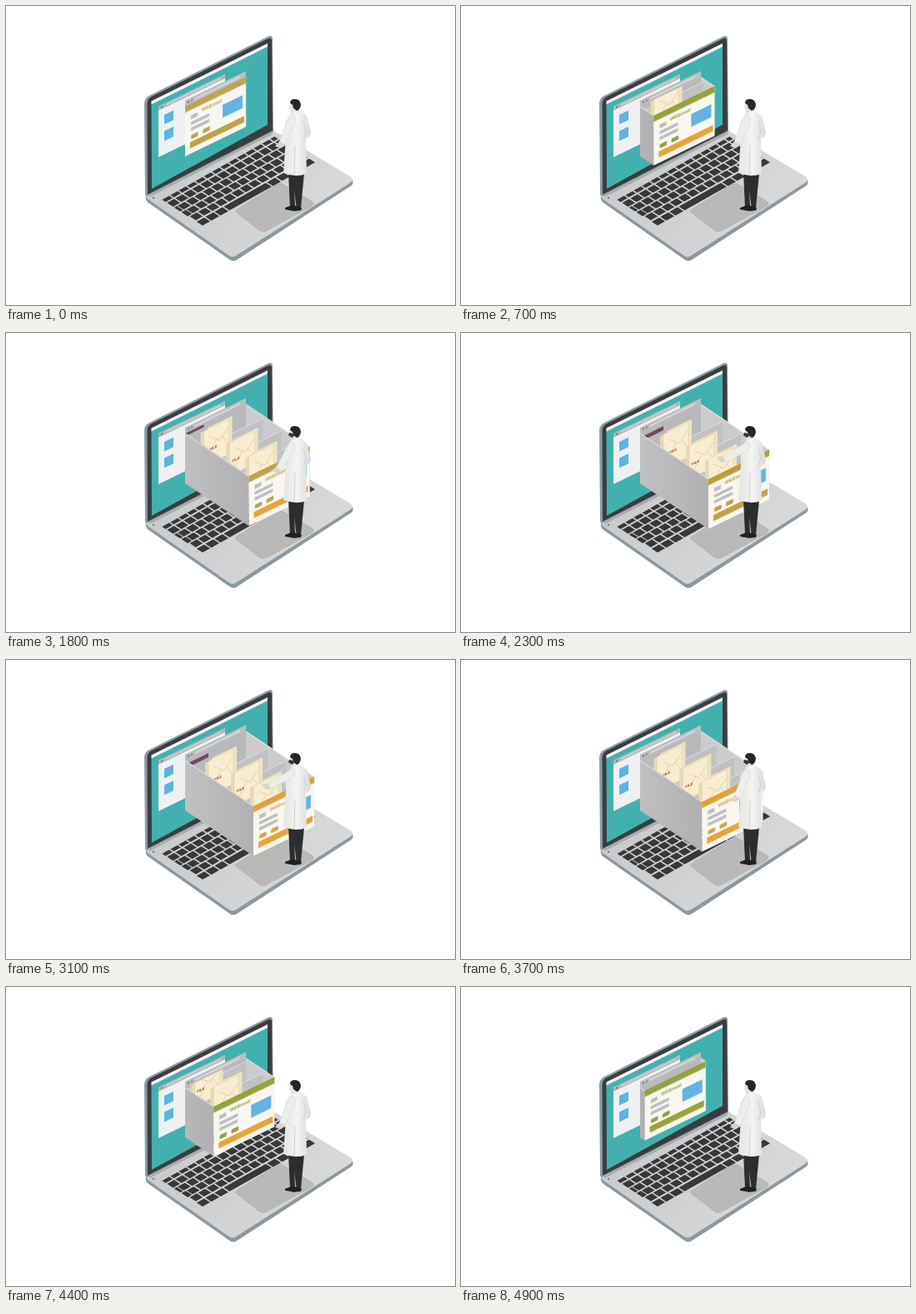
Recreate the animation shown at these times as an HTML page without scripts. Size 539 px wide and 360 px high, loop 5000 ms.

```html
<!DOCTYPE html>
<html lang="en">
<head>
<meta charset="utf-8">
<title>Laptop file drawer</title>
<style>
  html, body { margin: 0; width: 100%; height: 100%; overflow: hidden; background: #fff; }
  svg { display: block; width: 100%; height: 100%; }
  text { font-family: "Liberation Sans", Arial, sans-serif; font-weight: bold; }

  /* The drawer is drawn fully open; "slide" pushes it back into the screen. */
  .slide { animation: slide 5s infinite; }
  @keyframes slide {
    0% { transform: translate(-82px, -55px); animation-timing-function: step-end; }
    8% { transform: translate(-82px, -55px); animation-timing-function: steps(15, end); }
    38% { transform: none; animation-timing-function: step-end; }
    72% { transform: translate(-2px, -1.3px); animation-timing-function: steps(14, end); }
    100% { transform: translate(-82px, -55px); }
  }

  /* Each row of files appears once it has passed the screen plane. */
  .row1, .row2, .row3, .row4 { animation: row1 5s step-end infinite; }
  .row2 { animation-name: row2; }
  .row3 { animation-name: row3; }
  .row4 { animation-name: row4; }
  @keyframes row1 { 0%, 96% { visibility: hidden; } 14% { visibility: visible; } }
  @keyframes row2 { 0%, 90% { visibility: hidden; } 20% { visibility: visible; } }
  @keyframes row3 { 0%, 84% { visibility: hidden; } 28% { visibility: visible; } }
  @keyframes row4 { 0%, 74% { visibility: hidden; } 36% { visibility: visible; } }

  .arm { transform-origin: 343px 136px; animation: reach 5s infinite; }
  @keyframes reach {
    0% { transform: none; animation-timing-function: step-end; }
    34% { transform: none; animation-timing-function: steps(5, end); }
    44% { transform: rotate(38deg); animation-timing-function: step-end; }
    62% { transform: rotate(38deg); animation-timing-function: steps(5, end); }
    72%, 100% { transform: none; }
  }

  .accent { animation: accent 5s step-end infinite; }
  .strip { animation: strip 5s step-end infinite; }
  @keyframes accent {
    0%, 22% { fill: #c0a24e; }
    10%, 84% { fill: #94a23c; }
    40% { fill: #b5a03e; }
    62% { fill: #dfa03e; }
  }
  @keyframes strip {
    0%, 40% { fill: #bfa04a; }
    10%, 62% { fill: #e6a33c; }
    94% { fill: #98a33c; }
  }
</style>
</head>
<body>
<svg viewBox="0 0 539 360" preserveAspectRatio="none">
  <defs>
    <linearGradient id="deck" x1="0" x2="1" y1="0" y2=".4">
      <stop stop-color="#c6c7c9"/><stop offset="1" stop-color="#d9d9da"/>
    </linearGradient>
    <linearGradient id="side" x1="0" x2="1">
      <stop stop-color="#c1c1c3"/><stop offset="1" stop-color="#b1b1b4"/>
    </linearGradient>
    <linearGradient id="coat" x1="0" x2="1">
      <stop stop-color="#e4e5e3"/><stop offset=".5" stop-color="#f4f4f1"/><stop offset="1" stop-color="#d9dbda"/>
    </linearGradient>
    <clipPath id="pastLeft"><path d="M215 0H539V360H215z"/></clipPath>
    <clipPath id="pastRight"><path d="M288 0H539V360H288z"/></clipPath>
    <clipPath id="opening"><path d="M215 121L288 85.500L371 141V260H215z"/></clipPath>
    <g id="envelope">
      <path d="M-4 0H26V40H-4z" fill="#e6d9b4"/>
      <path d="M4 -2H34V37H4z" fill="#efe3c0"/>
      <path d="M0 0H30V42H0z" fill="#f8edcf" stroke="#dccfa8" stroke-width=".5"/>
      <path d="M6 9L19 20L30 9M6 32L15 17M30 31L22 17" fill="none" stroke="#dccda4" stroke-width=".7"/>
    </g>
    <g id="divider">
      <path d="M0 4H73V50H0z" fill="#c1c1c4"/>
      <path d="M0 4H73" stroke="#dededf"/>
    </g>
  </defs>

  <!-- base -->
  <path d="M168 229L321 151L413 207Q419 211 415 216L278 305Q273 309 268 305L171 237Q167 234 168 229z" fill="#8b989f"/>
  <path d="M169 228L321 150L413 205Q419 209 413 213L277 300Q272 304 267 300L171 233Q168 231 169 228z" fill="url(#deck)"/>
  <path d="M172 229L320 153" stroke="#a9abad" stroke-width="2"/>
  <circle cx="177" cy="231" r="1.2" fill="#77797b"/>
  <g transform="matrix(1 -.563 .833 .533 187 233)" fill="none" stroke="#37383a" stroke-width="8.6" stroke-dasharray="8.4 1.6">
    <path d="M0 3H135" stroke-width="5"/>
    <path d="M0 12H135"/>
    <path d="M0 22.500H135" stroke-dashoffset="-4"/>
    <path d="M0 22.500H3"/>
    <path d="M0 33H135" stroke-dashoffset="-6"/>
    <path d="M0 33H5"/>
    <path d="M0 43.500H135" stroke-dashoffset="-1"/>
    <path d="M0 54.500H9M10.500 54.500H20M21.500 54.500H31M32.500 54.500H83M84.500 54.500H94M95.500 54.500H105M106.500 54.500H135" stroke-dasharray="none"/>
  </g>
  <path d="M277 245L325 215Q329 212 333 215L367 235Q371 238 367 241L312 271Q308 273 304 270L277 249Q274 247 277 245z" fill="#bab9b8" stroke="#aaa" stroke-width=".6"/>

  <!-- lid and screen -->
  <path d="M166 118Q166 111 172 108L314 37Q320 34 320 40L321 151L169 229Q167 229 167 225z" fill="#8b9ca3"/>
  <path d="M169.500 118Q169.500 112 174 109.500L314 39.500Q319 37 319 42L320 150L170 227z" fill="#3a3d40"/>
  <path d="M174.500 117L314 47V143L175 220z" fill="#42b1ae"/>
  <path d="M174.500 114.500L314 45V49L174.500 118.500z" fill="#f4f5f5"/>

  <!-- back window -->
  <g transform="matrix(1 -.487 0 1 183 121)">
    <path d="M0 0H80V61H0z" fill="#eef0f1"/>
    <path d="M0 0H80V5H0z" fill="#b3b5b7"/>
    <path d="M9 2.500H75" stroke="#d5d6d7" stroke-width="1.500"/>
    <circle cx="4" cy="2.500" r="1.1" fill="#6e7072"/>
    <path d="M7 13.500H18V25H7zM7 33H18V45H7z" fill="#5bb5de"/>
  </g>

  <!-- front window frame and drawer opening -->
  <g transform="matrix(1 -.487 0 1 215 121)">
    <path d="M0 -7H73V60H0z" fill="#b8b9bb"/>
    <path d="M0 -7H73V0H0z" fill="#bcbdbf"/>
    <path d="M12 -3.500H66" stroke="#d9dadb" stroke-width="2"/>
    <circle cx="4" cy="-3.500" r="1.2" fill="#77797b"/>
    <circle cx="8" cy="-3.500" r="1.2" fill="#8f8578"/>
  </g>

  <!-- drawer -->
  <g clip-path="url(#pastRight)">
    <g class="slide">
      <path d="M288 86L370 141V200L288 145z" fill="#cbcbce"/>
      <path d="M288 86L370 141" stroke="#e2e2e3" stroke-width="1.500"/>
    </g>
  </g>
  <g clip-path="url(#opening)">
    <g class="slide">
      <path class="row4" d="M219 124L243 112V117L219 129z" fill="#704a5c"/>
      <g class="row3">
        <use href="#divider" transform="matrix(1 -.487 0 1 241 138)"/>
        <g transform="matrix(1 -.487 0 1 243 122)">
          <use href="#envelope"/>
          <text x="7" y="27" font-size="4.200" fill="#8c3c3e">FILE</text>
        </g>
      </g>
      <g class="row2">
        <use href="#divider" transform="matrix(1 -.487 0 1 263 153)"/>
        <g transform="matrix(1 -.487 0 1 274 136)">
          <use href="#envelope"/>
          <text x="3" y="25" font-size="4.200" fill="#8c3c3e">FILE</text>
        </g>
      </g>
      <g class="row1">
        <use href="#divider" transform="matrix(1 -.487 0 1 283 167)"/>
        <use href="#envelope" transform="matrix(1 -.487 0 1 297 152)"/>
      </g>
    </g>
  </g>
  <g clip-path="url(#pastLeft)">
    <g class="slide">
      <path d="M215 121L297 176V236L215 181z" fill="url(#side)"/>
      <path d="M215 121L297 176" stroke="#dadadb" stroke-width="1.500"/>
    </g>
  </g>
  <g class="slide">
    <g transform="matrix(1 -.487 0 1 297 176)">
      <path d="M0 0H73V60H0z" fill="#f8f6ef"/>
      <path class="accent" d="M0 0H73V7.500H0z"/>
      <text class="accent" x="19.500" y="16" font-size="5.700">WEBmail</text>
      <path d="M7 14H15V19H7zM7 22H29V26H7zM7 29H29V33H7z" fill="#bfc0c3"/>
      <path class="accent" d="M8 38H15Q17 40.500 15 43H8Q6 40.500 8 38zM22 38H29Q31 40.500 29 43H22Q20 40.500 22 38z"/>
      <path d="M45 20H69V35.500H45z" fill="#62b3e2"/>
      <path class="strip" d="M6 46H71V53.500H6z"/>
    </g>
  </g>

  <!-- doctor -->
  <path d="M339 201H358L356 222L354 243L349 245L346 222L347 241L341 243z" fill="#2c2d2f"/>
  <path d="M335 243L343 240L350 241L355 243L354 246L346 247L335 245z" fill="#202123"/>
  <path d="M342 122H352V131H342z" fill="#d7dfe0"/>
  <path d="M341 131L346 127L354 127L361 132L366 152L365 157L360 160L361 202Q347 207 333 201L336 158L335 140z" fill="url(#coat)"/>
  <path d="M357 138L360 151L357 160M347 168L346 203" fill="none" stroke="#c7cac9" stroke-width=".8"/>
  <g class="arm">
    <path d="M341 131Q348 132 347 140L335 167L328 164L335 145z" fill="#eceeeb" stroke="#cfd2d1" stroke-width=".5"/>
    <path d="M328 163L335 167L330 171L323 169z" fill="#ded3c6"/>
  </g>
  <path d="M341 118L340 123L344 127L350 124L350 116z" fill="#dce2e1"/>
  <path d="M341 117Q341 112 347 112Q353 112 354 119Q353 125 349 126L345 123L344 119z" fill="#242628"/>
  <path class="row3" d="M340 120L339 123L343 126L346 124L344 121z" fill="#303437"/>
</svg>
</body>
</html>
```
